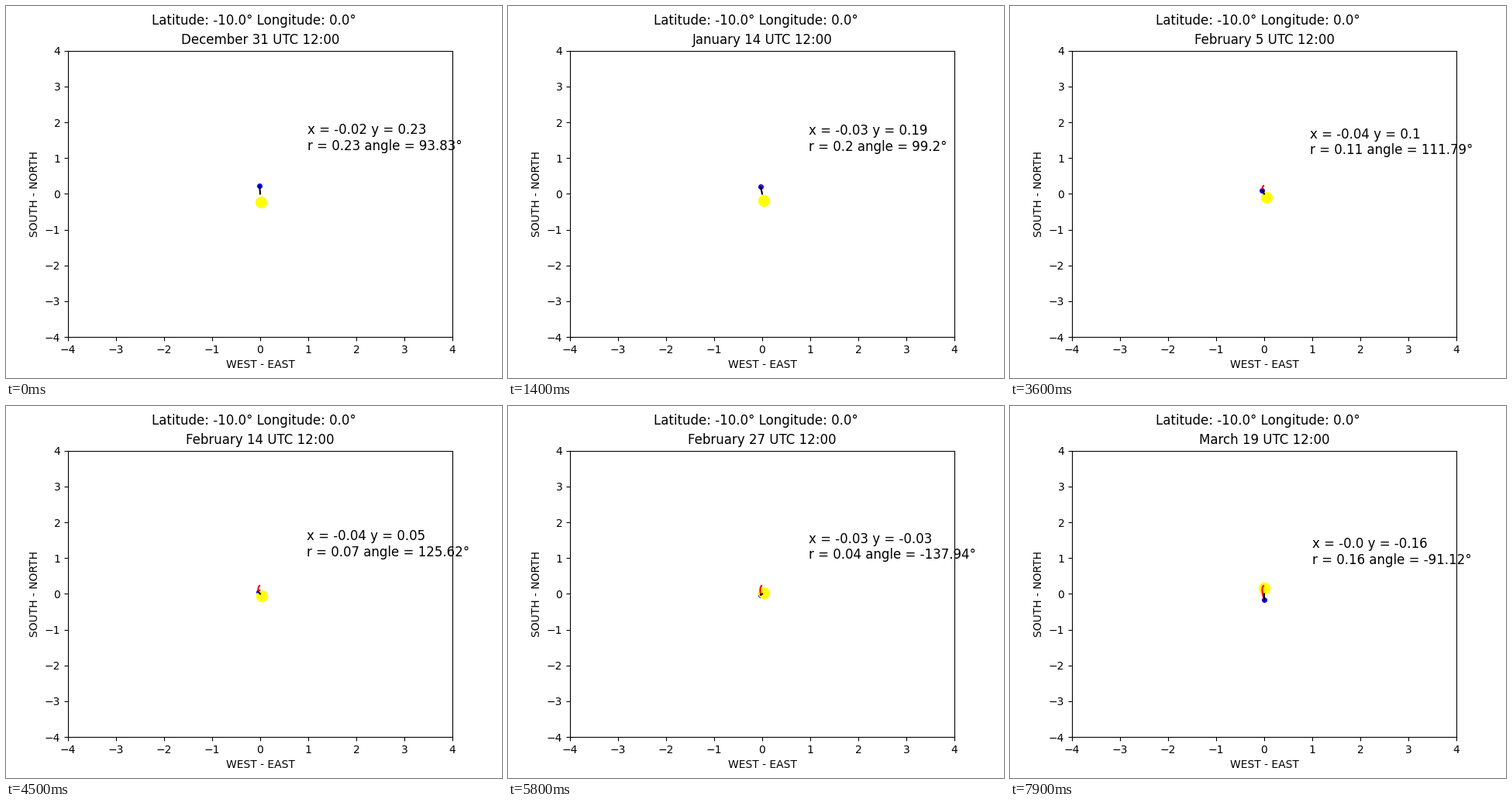
Write a matplotlib script that moves like this. It is 640x480 px and loops after 8000 ms.

```python
import numpy as np
import matplotlib.pyplot as plt
from matplotlib.animation import FuncAnimation

LAT, LON = -10.0, 0.0
TILT = np.radians(23.44)
YEAR = 365.25
SOLSTICE = 171.5          # day of the year of the June solstice
FRAMES = 80

MONTHS = [("January", 31, 0), ("February", 29, 31), ("March", 31, 59)]
DATES = [("December", 31, 365)]
for name, length, start in MONTHS:
    DATES += [(name, day, start + day) for day in range(1, length + 1)]


def shadow(day):
    """Horizontal part of the sunlight direction at mean noon."""
    lon = 2 * np.pi * (day - SOLSTICE) / YEAR + np.pi / 2
    lat = np.radians(LAT)
    east = (np.cos(TILT) - 1) * np.sin(lon) * np.cos(lon)
    meridian = np.cos(lon) ** 2 + np.cos(TILT) * np.sin(lon) ** 2
    polar = np.sin(TILT) * np.sin(lon)
    north = polar * np.cos(lat) - meridian * np.sin(lat)
    return -east, -north


xs, ys = shadow(np.array([d for _, _, d in DATES[:FRAMES]]))

fig, ax = plt.subplots(figsize=(6.4, 4.8), dpi=100)
fig.suptitle(f"Latitude: {LAT}° Longitude: {LON}°")
ax.set(xlim=(-4, 4), ylim=(-4, 4), xlabel="WEST - EAST", ylabel="SOUTH - NORTH")
title = ax.set_title("")
tip, = ax.plot([], [], "o", color="blue", ms=4)
sun, = ax.plot([], [], "o", color="yellow", ms=10)
trail, = ax.plot([], [], color="red")
stick, = ax.plot([], [], color="black")
label = ax.text(1, 1, "", fontsize=12)


def update(i):
    x, y = float(xs[i]), float(ys[i])
    month, day, _ = DATES[i]
    title.set_text(f"{month} {day} UTC 12:00")
    tip.set_data([x], [y])
    sun.set_data([-x], [-y])
    trail.set_data(xs[:i + 1], ys[:i + 1])
    stick.set_data([0, x], [0, y])
    r = round(float(np.hypot(x, y)), 2)
    angle = round(float(np.degrees(np.arctan2(y, x))), 2)
    label.set_position((1 + x, 1 + y))
    label.set_text(f"x = {round(x, 2)} y = {round(y, 2)}\nr = {r} angle = {angle}°")
    return title, tip, sun, trail, stick, label


anim = FuncAnimation(fig, update, frames=FRAMES, interval=100, repeat=True,
                     repeat_delay=0, blit=False)
plt.show()
```
